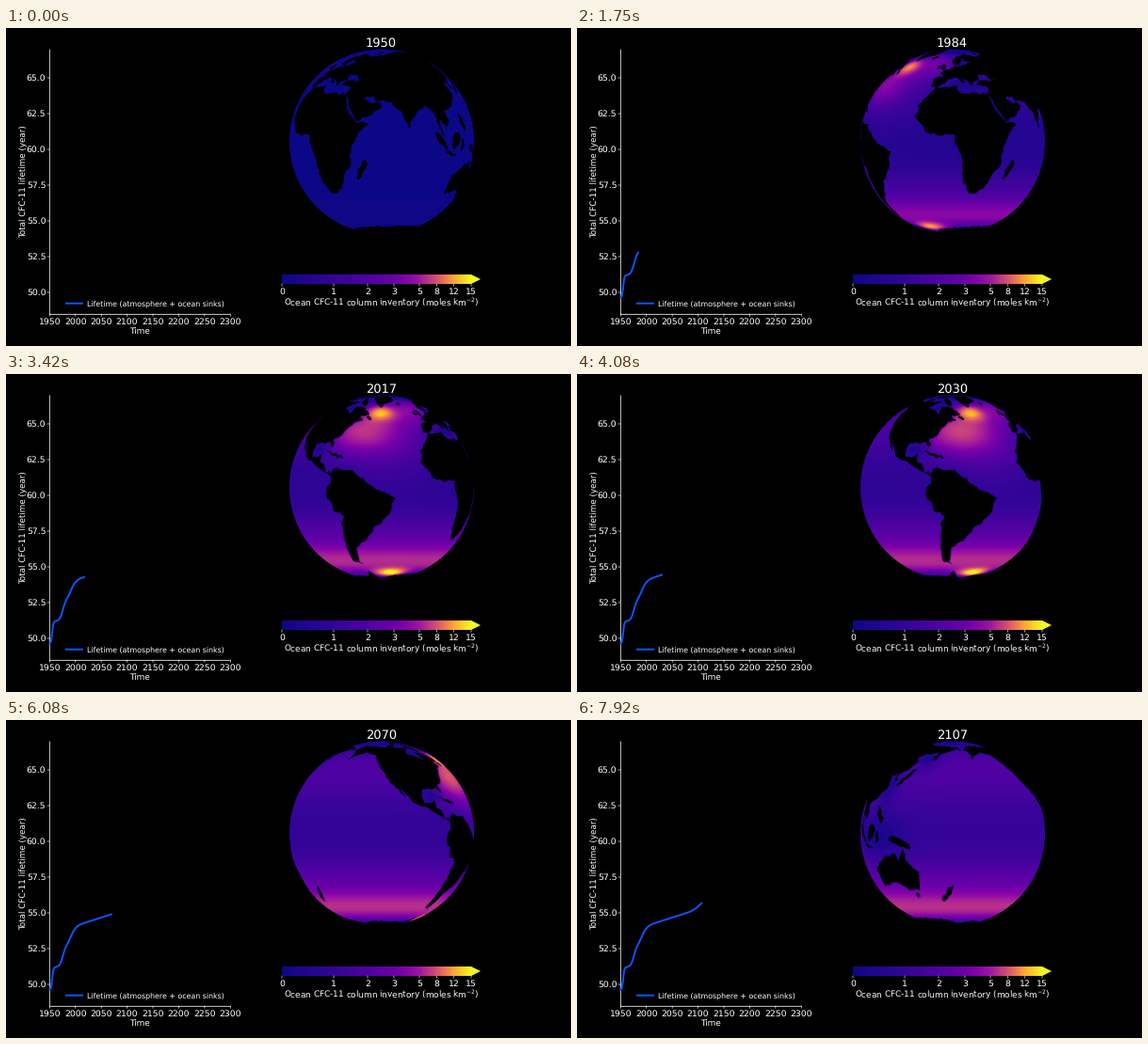
Write a matplotlib script that moves like this. It is 600 by 338 pixels and loops after 8000 ms.

```python
import numpy as np
import matplotlib
import matplotlib.pyplot as plt
from matplotlib.animation import FuncAnimation
from matplotlib.path import Path

matplotlib.rcParams["text.hinting"] = "none"
W, H, FRAMES = 600, 338, 160
rng = np.random.default_rng(4)

# Key coast points as lon, lat; smooth noise roughens the outlines
AFRICA = [-6, 35.8, 10, 37.2, 11, 33.5, 19, 30.5, 22, 32.8, 33, 31, 37.3, 20, 43, 11.5,
          51.2, 11.9, 40, -3, 40.6, -15, 35, -20, 32.5, -28, 26, -34, 18.5, -34.3,
          14.4, -22.5, 13.5, -12, 9, -1, 9, 4.2, -7.5, 4.5, -17.4, 14.5, -16.5, 22, -9.8, 30.5]
EUROPE = [-5.6, 36, 0, 39, 3.2, 43, 9, 44.3, 16, 38.5, 18, 40.3, 13, 44.8, 19.5, 41.5,
          23, 36.8, 24, 40.5, 29, 41.3, 30.5, 46, 37, 46.5, 41.5, 42, 62, 42, 62, 69,
          42, 67, 28, 71, 14, 67.5, 5.5, 61, 8, 58, 13, 56, 17.5, 61, 23, 65.5, 21.5, 61,
          29, 60, 22, 56, 12, 54.2, 8.3, 57, 8, 53.8, 1.6, 50.5, -4.7, 48.4, -1.3, 44,
          -9, 43.3, -9, 37]
NORTH_ASIA = [62, 69, 74, 72.5, 104, 77.6, 140, 72.5, 180, 69, 180, 65, 163, 59.5, 157, 51,
              156, 57, 162, 61.5, 142, 59, 135.5, 54.7, 141, 52, 134, 43, 127.5, 39.5,
              129, 35, 126.3, 35, 125, 39.5, 118.5, 39, 122, 36.5, 121.7, 29, 114, 22.3,
              106, 19.5, 109, 12, 104.8, 9, 100.5, 13.4, 99.5, 9.5, 104, 1.4, 98.3, 8,
              97, 16.5, 91.5, 22.7, 62, 42]
SOUTH_ASIA = [29, 41.2, 41.5, 41.6, 62, 43, 90, 43, 90, 22, 87, 21, 80.2, 15, 77.5, 8.1,
              72.8, 19, 67, 25, 57, 26.5, 50, 30, 48.5, 28.5, 51.5, 24.5, 56.3, 26,
              59.8, 22.5, 52, 15.8, 43.5, 12.8, 35, 28.5, 32.5, 30.5, 35.5, 34, 36, 36.5,
              27.5, 37]
AUSTRALIA = [113.7, -22.5, 122, -18, 129, -14.5, 136.8, -12.2, 139.5, -17.5, 142.5, -10.8,
             146, -18.5, 153, -25, 150, -37.3, 140.5, -38, 136, -34.5, 131, -31.5, 124, -33,
             115.3, -34.5]
NORTH_AMERICA = [-168, 65.6, -156.5, 71.3, -115, 68.5, -82, 68.5, -94, 60.5, -82.3, 55,
                 -79.5, 51.3, -78.3, 62.2, -65, 60, -56, 52, -66, 50, -61, 46, -70, 43,
                 -75.7, 35.3, -81, 31, -80.5, 25.3, -84, 30, -97, 28.5, -97, 20, -91, 18.5,
                 -87.5, 21.3, -88.5, 15.8, -83.5, 14.5, -83, 9.5, -78, 8.6, -80.3, 7.4,
                 -94, 16, -105.5, 20.3, -113, 31, -110, 23, -115, 29, -120.6, 34.5,
                 -124.3, 42, -134, 58, -146, 60.8, -163, 54.8, -162, 61]
SOUTH_AMERICA = [-78, 8.5, -72, 12, -62, 10.5, -50, 0.5, -35.2, -6, -39, -16, -48.5, -26,
                 -57, -36, -65, -41, -66, -47, -68.5, -53, -65.5, -55, -74, -52, -73.5, -38,
                 -70.3, -18.5, -76.2, -14, -81.2, -5, -77.5, 4]
GREENLAND = [-70, 78, -33, 83.6, -14, 81, -22, 70.3, -40, 65, -44, 60, -53.5, 67, -58, 75.5]

# Islands as ellipses: lon, lat, half length, half width, tilt
ISLANDS = [(46.8, -18.8, 6.8, 2, 70), (-2.5, 54, 4, 1.8, 110), (-8, 53.3, 1.8, 1.6, 0),
           (137.5, 37.5, 8, 1.5, 48), (172.5, -41.3, 7.3, 1.6, 55), (101, 0, 7.5, 1.6, -48),
           (110, -7.5, 4.8, 0.8, -8), (114, 1, 4.8, 3.6, 45), (121, -2, 3.5, 1.3, 80),
           (141, -5.5, 9.8, 2.2, -22), (123, 12, 6.5, 1.6, -60), (-18.5, 65, 5, 1.5, 0),
           (-73, 68.5, 10, 3.3, -35), (-110, 71, 8, 2, 0), (-85, 79.5, 22, 3, 10),
           (-76.5, 20.5, 8, 0.8, -18), (59, 74, 7, 1.5, 25), (-56, 48.7, 2.5, 1.6, 0),
           (-176, 67.3, 6, 1.8, -20), (146.5, -42, 1.7, 1.4, 0)]

# Half-degree world grid
STEP = 0.5
lons = np.arange(-180, 180, STEP) + STEP / 2
lats = np.arange(90, -90, -STEP) - STEP / 2
LON, LAT = np.meshgrid(lons, lats)


def blur(a, sigma):
    fy = np.fft.fftfreq(a.shape[0])[:, None]
    fx = np.fft.rfftfreq(a.shape[1])[None]
    k = np.exp(-2 * (np.pi * sigma) ** 2 * (fx ** 2 + fy ** 2))
    return np.fft.irfft2(np.fft.rfft2(a) * k, s=a.shape)


def rough():
    n = blur(rng.standard_normal(LON.shape), 2.5)
    return 0.5 * n / n.std()


def band(lat, width):
    return np.exp(-((LAT - lat) / width) ** 2)


def meridian(lon, width):
    return np.exp(-(((LON - lon + 180) % 360 - 180) / width) ** 2)


def bump(lat, lon, dlat, dlon):
    return band(lat, dlat) * meridian(lon, dlon)


# Land mask
wx, wy = LON + rough(), LAT + rough()
ice_edge = (-69.7 + 3.5 * np.cos(np.radians(LON - 100)) - 6 * meridian(-40, 15)
            - 6 * meridian(190, 20) + 8 * meridian(-63, 5))
land = wy < ice_edge
for coast in (AFRICA, EUROPE, NORTH_ASIA, SOUTH_ASIA, AUSTRALIA, NORTH_AMERICA,
              SOUTH_AMERICA, GREENLAND):
    inside = Path(np.reshape(coast, (-1, 2))).contains_points(np.c_[wx.ravel(), wy.ravel()])
    land |= inside.reshape(land.shape)
for lon, lat, a, b, tilt in ISLANDS:
    c, s = np.cos(np.radians(tilt)), np.sin(np.radians(tilt))
    dx, dy = wx - lon, wy - lat
    land |= ((dx * c + dy * s) / a) ** 2 + ((dy * c - dx * s) / b) ** 2 < 1

# Ocean inventory as a share of the colour scale; shallow seas hold little
shelf = np.clip(1.06 - 0.8 * blur(land.astype(float), 2.5), 0, 1)
for sea in ((25, -91, 6, 9), (60, -85, 9, 12), (38, 18, 8, 22), (-2, 125, 13, 20),
            (20, 39, 9, 6), (57, 19, 7, 9), (56, 150, 14, 14), (32, 125, 14, 9)):
    shelf *= 1 - 0.75 * bump(*sea)
shelf *= 1 - 0.8 / (1 + np.exp(-(LAT - 71) / 2.5))
zonal = (0.05 + 0.34 * band(-53, 13) + 0.09 * band(-32, 16) + 0.07 * band(42, 22)) * shelf
atlantic = (0.42 * bump(38, -58, 14, 25) + 0.06 * bump(20, -40, 18, 28)) * shelf
north = (0.72 * bump(54, -45, 7, 13) + 0.2 * bump(58, -15, 14, 28)) * shelf
weddell = 1.0 * bump(-67, -30, 5.5, 22) * shelf

# Orthographic view, two samples per pixel each way
CX, CY, R, SIZE, SS = 399, 120.6, 98, 200, 2
LEFT, TOP = 299, 20
off = (np.arange(SIZE * SS) + 0.5) / SS
gx, gy = np.meshgrid((LEFT + off - CX) / R, (CY - TOP - off) / R)
disc = gx ** 2 + gy ** 2 < 1
phi = np.arcsin(gy[disc])
dlon = np.degrees(np.arcsin(np.clip(gx[disc] / np.cos(phi), -1, 1)))
rows = ((90 - np.degrees(phi)) / STEP).astype(int)

plasma = matplotlib.colormaps["plasma"]
BLACK = 256
LUT = np.vstack([plasma(np.arange(256))[:, :3], [0, 0, 0]])


def sigmoid(year, mid, width):
    return 1 / (1 + np.exp(-(year - mid) / width))


def globe(year):
    g = sigmoid(year, 1978, 7)
    late = max(0, year - 2004)
    u = g * (zonal + weddell + 0.0002 * late * shelf)
    u += g * min(1, 0.65 + 0.008 * late) * atlantic
    u += g ** 0.6 * (1 - 0.004 * late) * north
    shade = np.where(land, BLACK, (u * 255).clip(0, 255).astype(int))
    lon0 = 60 - 1.55 * (year - 1950)
    cols = ((dlon + lon0 + 180) % 360 / STEP).astype(int) % len(lons)
    img = np.zeros(disc.shape + (3,))
    img[disc] = LUT[shade[rows, cols]]
    return img.reshape(SIZE, SS, SIZE, SS, 3).mean((1, 3))


def lifetime(year):
    steps = (1.6 * sigmoid(year, 1955, 1.2) + 1.45 * sigmoid(year, 1975.5, 3)
             + 1.45 * sigmoid(year, 1991.5, 4.5))
    return (49.6 + steps + 0.0115 * np.maximum(0, year - 2000)
            + 0.0005 * np.maximum(0, year - 2080) ** 2)


def year_x(year):
    return 46.3 + (year - 1950) * 192 / 350


def life_y(value):
    return 281 - (value - 50) * 15.2


fig = plt.figure(figsize=(W / 100, H / 100), dpi=100, facecolor="black")
ax = fig.add_axes([0, 0, 1, 1])
ax.axis("off")


def text(x, y, s, px, **kw):
    return ax.text(x, y, s, color="white", fontsize=px * 0.72, family="DejaVu Sans",
                   **{"ha": "center", "va": "baseline", **kw})


def rule(xs, ys, px=0.8, color="white", **kw):
    return ax.plot(xs, ys, color=color, lw=px * 0.72, snap=False, **kw)[0]


rule([46.3, 46.3, 238], [23, 304.3, 304.3])
for year in range(1950, 2301, 50):
    x = year_x(year)
    rule([x, x], [304, 306.3], 0.6)
    text(x, 314.7, str(year), 9.3)
for value in np.arange(50, 66, 2.5):
    y = life_y(value)
    rule([44, 46], [y, y], 0.6)
    text(42.4, y + 3.3, f"{value:.1f}", 9.3, ha="right")
text(142, 325.3, "Time", 8.85)
text(18.2, 163, "Total CFC-11 lifetime (year)", 8.8, rotation=90, va="center")

BLUE = "#0b55f7"
rule([64, 81], [292.7, 292.7], 2, BLUE)
text(86, 295.4, "Lifetime (atmosphere + ocean sinks)", 7.84, ha="left")

# Colour follows the amount linearly while the bar's spacing does not
BAR = {0: 293, 1: 348, 2: 384, 3: 412, 5: 439, 8: 457.5, 12: 475.5, 15: 494}
amounts = np.interp(np.linspace(293, 494, 402), list(BAR.values()), list(BAR))
ax.imshow(amounts[None], cmap=plasma, extent=(293, 494, 272, 262), aspect="auto")
ax.fill([494, 504, 494], [262, 267, 272], color=plasma(1.0), lw=0)
for amount, x in BAR.items():
    rule([x, x], [272, 274.3], 0.6)
    text(x, 282.6, str(amount), 9.3)
text(399, 295.2, "Ocean CFC-11 column inventory (moles km$^{-2}$)", 8.85)

title = text(398.5, 19.7, "1950", 13)
curve = rule([], [], 2, BLUE, solid_capstyle="round")
ball = ax.imshow(globe(1950), extent=(LEFT, LEFT + SIZE, TOP + SIZE, TOP),
                 interpolation="nearest", aspect="auto")
ax.set_xlim(0, W)
ax.set_ylim(H, 0)


def update(k):
    year = 1950 + max(0, k - 1)
    title.set_text(str(year))
    years = np.arange(1950, year + 1)
    curve.set_data(year_x(years), life_y(lifetime(years)))
    curve.set_visible(year > 1950)
    ball.set_data(globe(year))
    return title, curve, ball


anim = FuncAnimation(fig, update, frames=FRAMES, interval=8000 / FRAMES, repeat=True,
                     repeat_delay=0)
plt.show()
```
